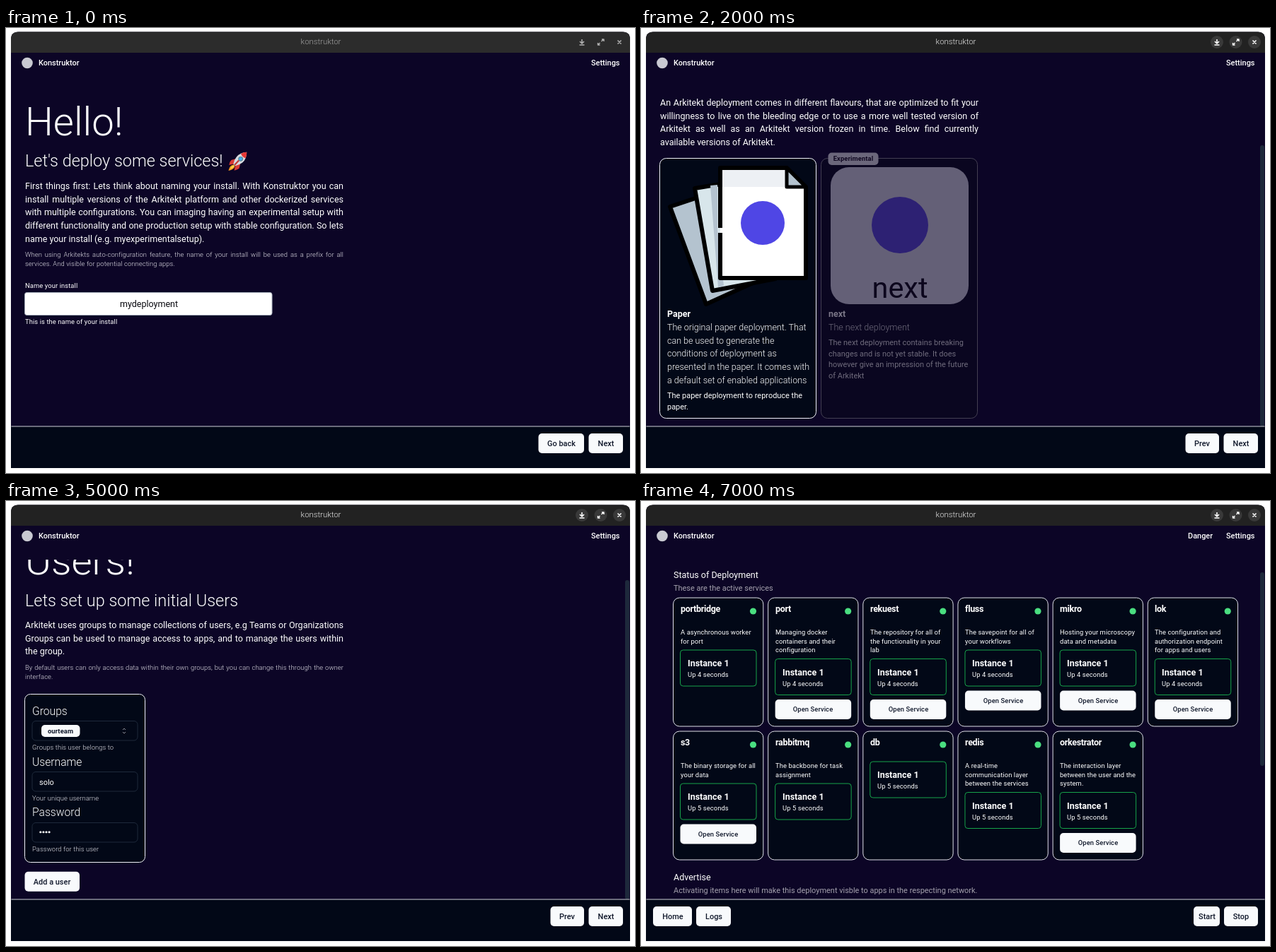
Animation, 889 px wide and 630 px high, one loop 8000 ms. Source, as an HTML page:

```html
<!DOCTYPE html>
<html lang="en">
<head>
<meta charset="utf-8">
<title>Setup walkthrough</title>
<style>
html, body { margin: 0; width: 100%; height: 100%; overflow: hidden; background: #fff; }
#stage { position: relative; width: 889px; height: 630px; overflow: hidden; font-family: Roboto, sans-serif; }
#stage svg, .layer { position: absolute; left: 0; top: 0; width: 889px; height: 630px; }
.content { clip-path: inset(83px 0 66px); }
.text { position: absolute; white-space: pre; transform-origin: 0 0; }
.justify { width: 576px; }
.justify div:not(:last-child) { white-space: normal; text-align-last: justify; }
</style>
</head>
<body>
<div id="stage"></div>
<script>
const STEP = 1000, SCALE = 0.78125;
const INK = '#0f172a', PANEL = '#020817', PAPER = '#f8fafc', BACK = '#0c0526', EDGE = '#1e293b', MUTED = '#a4a1ad';

// Text is placed by the centre of its first line; the smallest size is set slightly looser.
function text(x, y, lines, o = {}) {
  const { size = 16, lead = size * 1.5, weight = 400, color = '#fff', align = '', track = size < 14 ? 0.01 : 0 } = o;
  const rows = [].concat(lines).map(line => `<div>${line}</div>`).join('');
  const shift = align === 'center' ? '-50%' : '0';
  return `<div class="text ${align}" style="left:${x}px;top:${y}px;font-size:${size}px;line-height:${lead}px;` +
    `font-weight:${weight};color:${color};letter-spacing:${track}em;` +
    `transform:scale(${SCALE}) translate(${shift},${-lead / 2}px)">${rows}</div>`;
}
const svg = shapes => `<svg viewBox="0 0 889 630">${shapes}</svg>`;
const rect = (x, y, w, h, r, fill, stroke = 'none') =>
  `<rect x="${x}" y="${y}" width="${w}" height="${h}" rx="${r}" fill="${fill}" stroke="${stroke}"/>`;
const circle = (x, y, r, fill) => `<circle cx="${x}" cy="${y}" r="${r}" fill="${fill}"/>`;
const path = (d, fill, stroke = 'none', width = 1) =>
  `<path d="${d}" fill="${fill}" stroke="${stroke}" stroke-width="${width}" stroke-linejoin="round"/>`;
const place = (x, y, scale, art) => `<g transform="translate(${x} ${y}) scale(${scale})">${art}</g>`;
const dots = (x, y, count, fill) => Array.from({ length: count }, (_, i) => circle(x + i * 4.1, y, 1.55, fill)).join('');

const title = (words, y = 132.5) => text(26.5, y, words, { size: 72, lead: 72, weight: 300 });
const subtitle = (words, y = 186.5, size = 24) => text(26.5, y, words, { size, weight: 300 });
const paragraph = (y, lines) => text(26.5, y, lines, { align: 'justify' });
const fine = (x, y, lines, align) => text(x, y, lines, { size: 12, lead: 16, weight: 300, color: '#e2e1e8', align });
const label = (x, y, words) => text(x, y, words, { size: 20, weight: 300 });
const small = (x, y, lines, color) => text(x, y, lines, { size: 14, lead: 20, color });
const button = (x, y, w, words, fill = PAPER, size = 14, color = INK, stroke) =>
  svg(rect(x, y, w, 28, 5, fill, stroke)) + text(x + w / 2, y + 14, words, { size, weight: 500, color, align: 'center' });
const input = (y, w) => rect(26.5, y, w, 32, 3, '#fff', '#a5adba');
const scrollbar = (y, bottom) => svg(rect(875, y, 6, bottom - y, 3, EDGE));

const rocket =
  path('M18 43Q5 44 1 63Q20 59 22 47Z', '#ff9d1e') + path('M18 45Q10 48 7 57Q16 54 20 48Z', '#ffdf52') +
  path('M24 24L10 28Q4 34 3 44L22 40ZM40 40L36 55Q30 60 20 62L24 43Z', '#d93a35') +
  path('M61 2Q39 3 27 18Q19 28 17 41L23 47Q37 44 47 36Q61 25 61 2Z', '#d5dbe0') +
  path('M61 2Q50 2 42 7Q45 17 57 22Q62 13 61 2Z', '#e53935') +
  circle(41, 24, 8, '#607d8b') + circle(41, 24, 5.5, '#3fb2ee') + path('M35 29L21 44', 'none', '#c23732', 5);

const popper =
  path('M2 59L15 23Q33 29 42 49L6 62Q1 64 2 59Z', '#ffc928') +
  path('M10 38L25 55L17 58L6 48ZM15 23L37 51L33 53L12 31Z', '#fff09b') +
  `<ellipse cx="28" cy="36" rx="18" ry="7" transform="rotate(47 28 36)" fill="#c96e13"/>` +
  path('M27 35C30 27 34 22 31 18C27 13 23 19 22 12C21 5 27 7 29 2', 'none', '#e64538', 5) +
  path('M30 37C34 28 42 33 42 25C41 17 51 22 51 14C50 6 57 10 59 3', 'none', '#f48fb1', 5) +
  path('M33 41C38 34 45 36 46 42C48 49 52 37 60 41M45 47Q53 43 58 50', 'none', '#29a7ec', 5) +
  path('M2 8l6 2-2 5-5-2zM47 31l7-3 2 5-6 3z', '#29a7ec') + path('M54 58l6-2 1 5-6 2z', '#e64538') +
  circle(8, 24, 3, '#f48fb1') + circle(35, 7, 3, '#ffc928') + circle(47, 57, 2.5, '#f48fb1');

const hero =
  path('M19 23Q8 32 0 30Q6 40 3 49Q12 51 18 44L32 27Z', '#d9322e') +
  path('M20 25Q28 20 34 25L37 30L33 43L25 47L18 42Z', '#2686c9') +
  path('M33 29Q40 22 40.5 11', 'none', '#318fd0', 5.5) + path('M21 27L14 35L22 40', 'none', '#318fd0', 4.5) +
  path('M18 40L33 40L31 48L24 52L20 60L13 58Z', '#2874b8') +
  path('M12 54L21 56L17 62Q14 65 10 62ZM27 46L33 48L27 57L21 55Z', '#d9322e') +
  path('M18 39L33 39L32 44Q25 46 18 43Z', '#d9322e') + path('M25 29L31 29L28 35Z', '#ffcb35') +
  circle(40.5, 6, 3.4, '#f9bd31') + circle(26, 14, 6.5, '#f9bd31') +
  path('M19 13Q18 4 26 3.5Q34 4 33 13Q30 8 26 9.5Q21 9 19 13Z', '#543930') +
  path('M21 13h3M28 13h3M24 17q2 2 4 0', 'none', '#6b4330', 1.4);

const papers =
  path('M41 253L101 233L160 360L92 391Z', '#b4c3cf', '#000', 6) +
  path('M76 227L118 220L190 355L101 372Z', '#d8e6eb', '#000', 6) +
  path('M98 223L108 222V285L117 365L109 367Z', '#b4c3cf') +
  path('M112 198H206L233 225V354H112Z', '#fff') + path('M114 200H206V225H114Z', '#edf0f4') +
  path('M112 283V198H206L233 225V354H112V290', 'none', '#000', 6) +
  path('M206 198V225H233Z', '#b4c3cf', '#000', 5) + circle(172, 276, 31, '#4f46e5');

function windowFrame(active, danger) {
  const glyph = active ? '#fff' : '#b0b0b0';
  const nav = { size: 14, weight: 500 };
  return svg(
    path('M7 623V16Q7 5.5 17.5 5.5H871.5Q882 5.5 882 16V623Z', BACK) +
    path('M7 35V16Q7 5.5 17.5 5.5H871.5Q882 5.5 882 16V35Z', active ? '#222' : '#2c2c2c') +
    (active ? [814, 840.5, 867].map(x => circle(x, 20, 9, '#393939')).join('') : '') +
    path('M814 16V21M811 19L814 22L817 19M810.5 24H817.5M864.5 17.5L869.5 22.5M869.5 17.5L864.5 22.5', 'none', glyph, 1.6) +
    path('M841.5 19L844.5 16M842 16H845V19M839.5 21L836.5 24M836.5 21V24H839.5', 'none', glyph, 1.4) +
    circle(30, 49.5, 7.8, '#c9cad2')) +
    text(444.5, 20, 'konstruktor', { size: 14.5, weight: 300, color: active ? '#e6e6e6' : '#a2a2a2', align: 'center' }) +
    text(46, 49.2, 'Konstruktor', nav) + text(827, 49.2, 'Settings', nav) +
    (danger ? text(772.5, 49.2, 'Danger', nav) : '');
}
const footer = buttons => svg(rect(7, 564, 875, 59, 0, PANEL) + rect(7.5, 563.5, 874, 1, 0, '#d0d1d8')) + buttons;
const wizardButtons = hover => button(769.5, 574, 47.5, 'Prev') + button(823.5, 574, 48.5, 'Next', hover ? '#e1e2e7' : PAPER);

const namePage = () => title('Hello!') + subtitle("Let's deploy some services!", 188, 30) +
  svg(place(314, 175, 0.43, rocket) + input(374.5, 349.5)) +
  paragraph(223.5, ['First things first: Lets think about naming your install. With Konstruktor you can',
    'install multiple versions of the Arkitekt platform and other dockerized services',
    'with multiple configurations. You can imaging having an experimental setup with',
    'different functionality and one production setup with stable configuration. So lets',
    'name your install (e.g. myexperimentalsetup).']) +
  fine(26.5, 321, ['When using Arkitekts auto-configuration feature, the name of your install will be used as a prefix for all',
    'services. And visible for potential connecting apps.'], 'justify') +
  text(26.5, 364.5, 'Name your install', { size: 12 }) +
  text(201.5, 390.5, 'mydeployment', { color: '#09090f', align: 'center' }) +
  text(26.5, 416, 'This is the name of your install', { size: 12 });

const dockerPage = () => title('About Docker!') + subtitle("Let's check if docker is installed") +
  paragraph(220.5, ['This manager works with docker. Docker is a container runtime that allows us to',
    'run software completely isolated from your system. Like this we can ensure that',
    'Arkitekt does not interfere with your system and that you can run multiple',
    'deployments on the same system.']) +
  svg(place(30, 307, 1, popper) + place(235, 498, 0.21, popper) + rect(26.5, 471.5, 449, 50.5, 6, 'none', '#cfced6')) +
  text(26.5, 395.5, 'Beautiful, we found docker on your system!') +
  button(26.5, 424, 93.5, 'Show Version', 'none', 14, '#fff', EDGE) +
  small(40, 489, ['Double lucky! It appears that the docker api is also accessible. You will be able to',
    'monitor your installation in Konstruktor.']);

const flavourPage = () => paragraph(105.5, ['An Arkitekt deployment comes in different flavours, that are optimized to fit your',
    'willingness to live on the bleeding edge or to use a more well tested version of',
    'Arkitekt as well as an Arkitekt version frozen in time. Below find currently',
    'available versions of Arkitekt.']) +
  svg(rect(26.5, 184.5, 221, 368, 9, PANEL, '#f0f1f5') + rect(254.5, 184.5, 221, 368, 9, '#0a0620', '#433f52') +
    rect(264.5, 176.5, 71, 17.5, 5, '#6b677b') + papers +
    rect(268, 197, 195, 194, 26, '#646077') + circle(366, 279, 40, '#2d2173')) +
  text(300, 185, 'Experimental', { size: 12, weight: 600, color: '#100821', align: 'center' }) +
  text(366, 367.5, 'next', { size: 53, lead: 60, color: '#0c061d', align: 'center' }) +
  text(37, 405, 'Paper', { weight: 600 }) +
  text(37, 423.5, ['The original paper deployment. That', 'can be used to generate the', 'conditions of deployment as',
    'presented in the paper. It comes with', 'a default set of enabled applications'], { weight: 300 }) +
  small(37, 519.5, ['The paper deployment to reproduce the', 'paper.']) +
  text(264.8, 405, 'next', { weight: 600, color: '#7a7687' }) +
  text(264.8, 423.5, 'The next deployment', { weight: 300, color: '#6f6b7c' }) +
  small(264.8, 444.5, ['The next deployment contains breaking', 'changes and is not yet stable. It does',
    'however give an impression of the future', 'of Arkitekt'], '#6f6b7c') +
  scrollbar(166, 564);

const ownerPage = () => title('Attention !') + subtitle('Your Arkitekt instance needs an Owner') +
  paragraph(220.5, ['Administrators are power users that can manage the Arkitekt instance. and have',
    'access to all data. You can add more administrators later. This owner user will be',
    'created during the setup process and will be able to access every services that is',
    'running on this instance.']) +
  svg(place(304, 101, 1, hero) + input(321.5, 160) + input(404, 160) + dots(98.5, 419.8, 5, '#09090f') +
    rect(26.5, 464.5, 449, 66.5, 6, 'none', '#6f6678')) +
  label(26.5, 307, 'Username') + text(106.5, 337.5, 'owner', { color: '#09090f', align: 'center' }) +
  fine(26.5, 363, 'The login name') + label(26.5, 390, 'Password') + fine(26.5, 446, 'A password for the owner user') +
  small(40, 482.5, ['Important, please never sign in as a owner user when using the platform as a normal',
    'user. (e.g. to create workflows). You should only use the owner user to manage the', 'platform.'], '#f7cfd0');

const usersIntro = y => title('Users!', y - 55.5) + subtitle('Lets set up some initial Users', y, 30) +
  paragraph(y + 35.5, ['Arkitekt uses groups to manage collections of users, e.g Teams or Organizations',
    'Groups can be used to manage access to apps, and to manage the users within', 'the group.']) +
  fine(26.5, y + 95.5, ['By default users can only access data within their own groups, but you can change this through the owner',
    'interface.'], 'justify');

const usersPage = () => usersIntro(140.5) +
  svg(rect(26.5, 273.5, 170, 238, 8, PANEL, '#f0f1f5') +
    [311.5, 383.5, 455.5].map(y => rect(37, y, 149, 27.5, 5, 'none', EDGE)).join('') +
    rect(50, 317, 54.5, 17, 5, PAPER) + path('M165 324L167 322L169 324M165 327L167 329L169 327', 'none', '#8c909a') +
    dots(48.8, 468.8, 4, '#fff')) +
  label(37, 298, 'Groups') + text(77.2, 325.5, 'ourteam', { size: 12, weight: 600, color: INK, align: 'center' }) +
  fine(37, 349, 'Groups this user belongs to') +
  label(37, 369.5, 'Username') + small(47, 397.7, 'solo') + fine(37, 421, 'Your unique username') +
  label(37, 441.3, 'Password') + fine(37, 492.5, 'Password for this user') +
  button(26.5, 524.7, 77.5, 'Add a user') + scrollbar(112, 564);

const readyPage = () => title('Done!') + subtitle("Let's deploy some services!", 188, 30) + svg(place(314, 175, 0.43, rocket));

// name, whether it can be opened, description lines
const services = [
  ['portbridge', 0, 'A asynchronous worker', 'for port'],
  ['port', 1, 'Managing docker', 'containers and their', 'configuration'],
  ['rekuest', 1, 'The repository for all of', 'the functionality in your', 'lab'],
  ['fluss', 1, 'The savepoint for all of', 'your workflows'],
  ['mikro', 1, 'Hosting your microscopy', 'data and metadata'],
  ['lok', 1, 'The configuration and', 'authorization endpoint', 'for apps and users'],
  ['s3', 1, 'The binary storage for all', 'your data'],
  ['rabbitmq', 0, 'The backbone for task', 'assignment'],
  ['db', 0],
  ['redis', 0, 'A real-time', 'communication layer', 'between the services'],
  ['orkestrator', 1, 'The interaction layer', 'between the user and the', 'system.'],
];
function serviceCard([name, canOpen, ...lines], i) {
  const row = Math.floor(i / 6), x = 45.5 + (i % 6) * 134.15, y = 137 + row * 189;
  const box = y + (lines.length ? 49 + 12.5 * lines.length : 43);
  return svg(rect(x, y, 127.3, 182, 9, PANEL, '#dfe1e7') + circle(x + 113, y + 19, 4.6, '#4ade80') +
      rect(x + 10, box, 107.5, 51, 4, 'none', '#16a34a')) +
    text(x + 10, y + 16, name, { weight: 600, track: -0.025 }) +
    text(x + 10, y + 49, lines, { size: 12, lead: 16 }) +
    text(x + 20, box + 19, 'Instance 1', { weight: 600 }) +
    text(x + 20, box + 35, `Up ${4 + row} seconds`, { size: 12 }) +
    (canOpen ? button(x + 10, box + 57.5, 107.5, 'Open Service', PAPER, 12) : '');
}
const statusPage = () => text(45.5, 105, 'Status of Deployment') + small(45.5, 123, 'These are the active services', MUTED) +
  services.map(serviceCard).join('') + text(45.5, 533, 'Advertise') +
  small(45.5, 550.5, 'Activating items here will make this deployment visble to apps in the respecting network.', MUTED) +
  scrollbar(101, 375);

const scenes = [
  { page: namePage, idle: true, buttons: button(752.5, 574, 64.5, 'Go back') + button(823.5, 574, 48.5, 'Next') },
  { page: dockerPage, buttons: wizardButtons(true) },
  { page: flavourPage, buttons: wizardButtons() },
  { page: ownerPage, buttons: wizardButtons(true) },
  { page: () => usersIntro(188) + button(26.5, 321, 77.5, 'Add a user'), buttons: wizardButtons() },
  { page: usersPage, buttons: wizardButtons() },
  { page: readyPage, buttons: wizardButtons(true) },
  { page: statusPage, danger: true, buttons: button(17, 574, 55, 'Home') + button(78, 574, 49, 'Logs') +
      button(781, 574, 37, 'Start') + button(824, 574, 48, 'Stop') },
];

const stage = document.getElementById('stage');
let shown = -1;
function draw() {
  const index = Math.floor(performance.now() / STEP) % scenes.length;
  if (index !== shown) {
    const { page, idle, danger, buttons } = scenes[shown = index];
    stage.innerHTML = windowFrame(!idle, danger) + `<div class="layer content">${page()}</div>` + footer(buttons);
  }
  requestAnimationFrame(draw);
}
draw();
</script>
</body>
</html>
```
